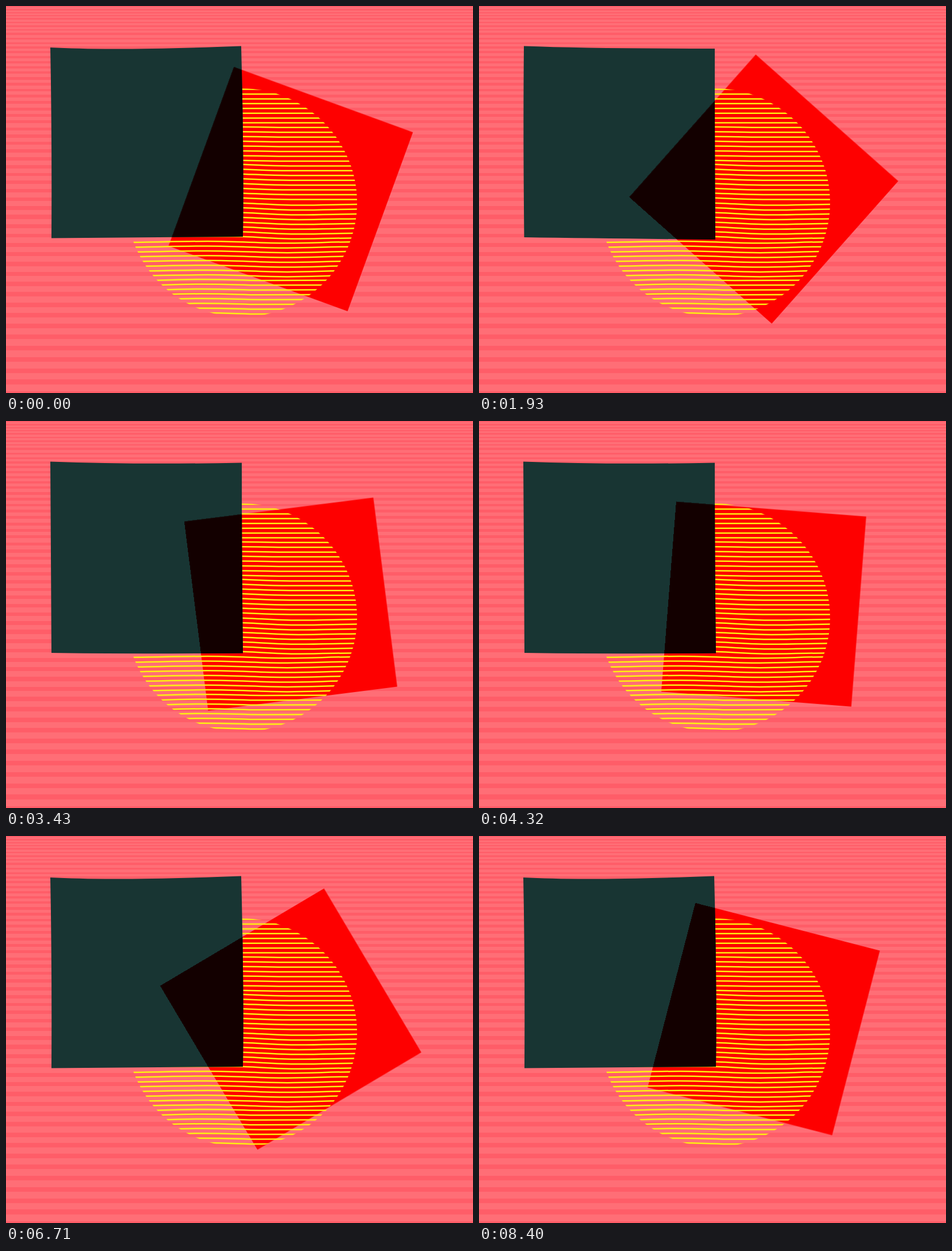
These frames come from a looping animation (822x681 px, 8500 ms). An HTML page without scripts:

```html
<!DOCTYPE html>
<html lang="en">
<head>
<meta charset="utf-8">
<title>Turning square</title>
<style>
  html, body { margin: 0; width: 100%; height: 100%; overflow: hidden; background: #ff6e76; }
  svg { position: absolute; inset: 0; width: 822px; height: 681px; }

  /* Stripe pitch grows steadily down the page, four stripes per strip */
  .strip {
    --pitch: calc(5.357px + 1.214px * var(--i));
    height: calc(4 * var(--pitch));
    background: repeating-linear-gradient(#ff5d68 0 calc(.42 * var(--pitch)), #ff6e76 0 var(--pitch));
  }

  .wave { d: var(--wave); }

  .spin { transform-origin: 501.2px 322.2px; animation: spin 8.5s infinite; }
  @keyframes spin {
    0%      { transform: rotate(20.05deg); animation-timing-function: step-end; }
    1.764%  { transform: rotate(23.15deg); animation-timing-function: steps(3); }
    12.117% { transform: rotate(32.45deg); animation-timing-function: steps(3); }
    22.705% { transform: rotate(41.6deg);  animation-timing-function: step-end; }
    26.235% { transform: rotate(49deg);    animation-timing-function: step-end; }
    29.764% { transform: rotate(60.3deg);  animation-timing-function: steps(3); }
    40.352% { transform: rotate(82.8deg);  animation-timing-function: steps(7); }
    64.823% { transform: rotate(123.7deg); animation-timing-function: steps(3); }
    75.411% { transform: rotate(147.8deg); animation-timing-function: step-end; }
    78.941% { transform: rotate(149.3deg); animation-timing-function: steps(4); }
    92.941% { transform: rotate(181deg);   animation-timing-function: step-end; }
    98.823% { transform: rotate(194.5deg); animation-timing-function: step-end; }
    100%    { transform: rotate(200.05deg); }
  }

  .slab { animation: wobble 8.5s step-end infinite; }
  @keyframes wobble {
    0%, 8.705%, 54.352%, 92.941%, 100% {
      d: path("M78,73 Q190,79 414,70.5 Q419,270 417,406 Q240,407 80,408.5 Q81,230 78,73Z");
    }
    1.764%, 85.882% {
      d: path("M78,74 Q190,79 413,69.5 Q420,270 418,405 Q240,407 81,409 Q82,230 78,74Z");
    }
    12.117%, 33.294% {
      d: path("M78,71.5 Q230,77 415,73.5 Q415,250 417,408.5 Q200,410 80,408 Q79,230 78,71.5Z");
    }
    22.705% {
      d: path("M79,70.5 Q200,75 415,75 Q415,300 416,411 Q220,409 79.5,407 Q77.5,220 79,70.5Z");
    }
  }
</style>
</head>
<body>
<div class="strip" style="--i:0"></div>
<div class="strip" style="--i:1"></div>
<div class="strip" style="--i:2"></div>
<div class="strip" style="--i:3"></div>
<div class="strip" style="--i:4"></div>
<div class="strip" style="--i:5"></div>
<div class="strip" style="--i:6"></div>
<div class="strip" style="--i:7"></div>
<div class="strip" style="--i:8"></div>
<div class="strip" style="--i:9"></div>
<div class="strip" style="--i:10"></div>
<div class="strip" style="--i:11"></div>
<div class="strip" style="--i:12"></div>
<div class="strip" style="--i:13"></div>

<svg viewBox="0 0 822 681">
  <defs>
    <path id="line" class="wave"/>
    <g id="pair"><use href="#line"/><use href="#line" y="8.44"/></g>
    <g id="four"><use href="#pair"/><use href="#pair" y="16.88"/></g>
    <g id="band"><use href="#four"/><use href="#four" y="33.76"/></g>
    <clipPath id="disc"><ellipse cx="415" cy="346" rx="203" ry="201"/></clipPath>
    <clipPath id="inSlab"><path class="slab"/></clipPath>
  </defs>

  <rect class="spin" x="333.5" y="154.5" width="335.4" height="335.4" fill="#fe0000"/>

  <!-- Lines run flat at the top and ripple more towards the bottom -->
  <g clip-path="url(#disc)" fill="none" stroke="#fff010" stroke-width="2.5">
    <use href="#band" y="146.5" style="--wave:path('M205,0 H630')"/>
    <use href="#band" y="214" style="--wave:path('M205,-1.5 H400 C430,-1.5 455,-.2 490,-.2 H630')"/>
    <use href="#band" y="281.5" style="--wave:path('M205,-3 H400 C430,-3 455,-.1 500,-.1 H630')"/>
    <use href="#band" y="349" style="--wave:path('M205,-2.6 H400 C435,-2.6 470,1.6 515,1.6 S590,0 630,0')"/>
    <use href="#band" y="416.5" style="--wave:path('M205,-.5 C255,-.5 300,-2.5 355,-2.5 S445,.8 495,.8 S570,-1.6 630,-1.6')"/>
    <use href="#band" y="484" style="--wave:path('M205,0 C255,0 290,-3 345,-3 S410,-1.1 450,-1.1 S550,-1.7 630,-1.7')"/>
  </g>

  <path class="slab" fill="#183533"/>
  <g clip-path="url(#inSlab)">
    <rect class="spin" x="333.5" y="154.5" width="335.4" height="335.4" fill="#130000"/>
  </g>
</svg>
</body>
</html>
```
